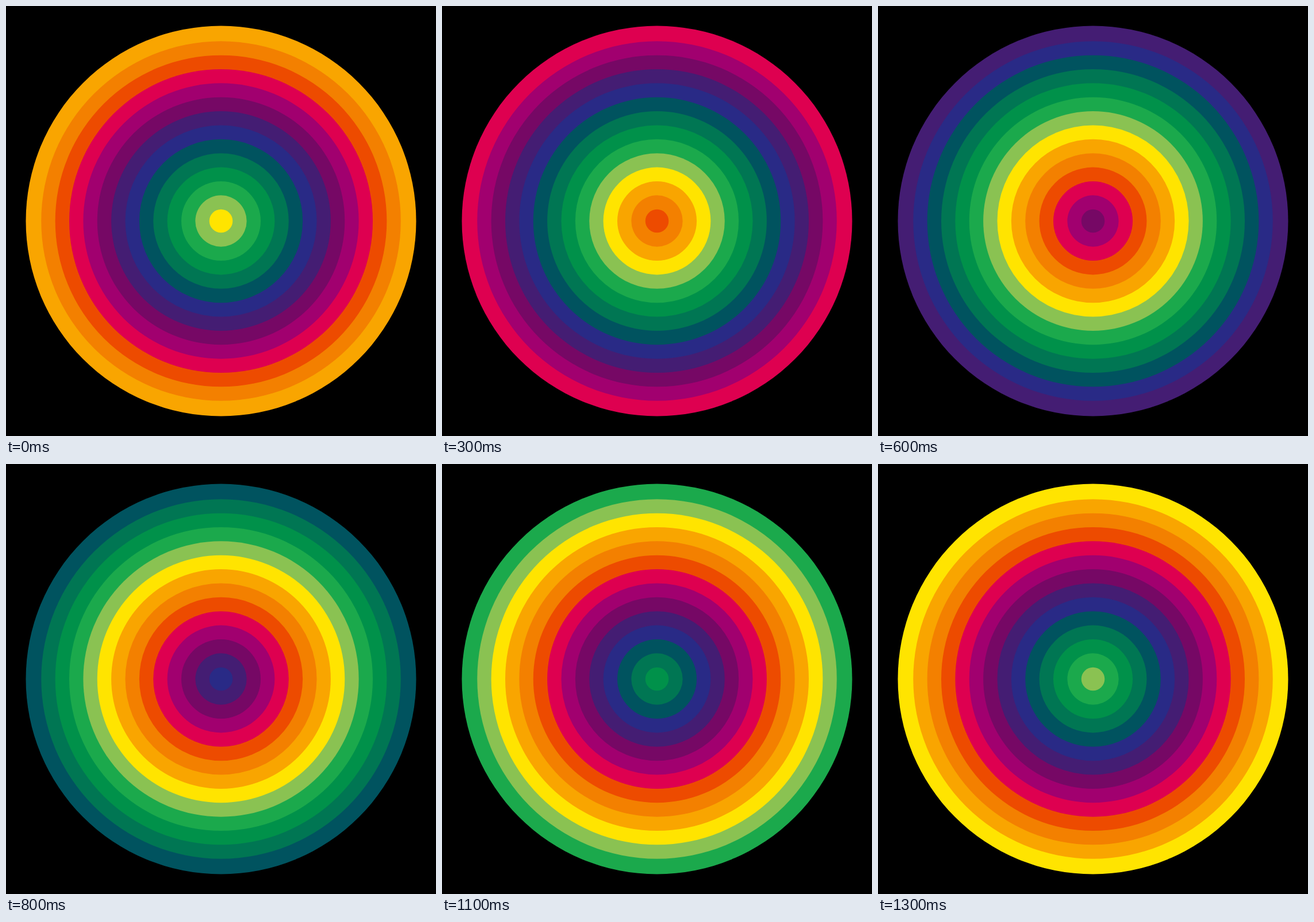
Animation of 748x748 px, one loop 1400 ms. Source, as an HTML page:

```html
<!DOCTYPE html>
<html lang="en">
<head>
<meta charset="utf-8">
<title>Rainbow rings</title>
<style>
  html, body { margin: 0; width: 100%; height: 100%; overflow: hidden; background: #000; }
  svg { display: block; width: 100%; height: 100%; }
</style>
</head>
<body>
<svg id="stage" viewBox="0 0 748 748"></svg>
<script>
  const COLORS = [
    '#ffe400', '#f9a500', '#f38000', '#ed4b00', '#de0050', '#a1006f', '#760865',
    '#441d73', '#292a86', '#00535f', '#007653', '#00914a', '#1ba94c', '#8ac252'
  ];
  const COUNT = COLORS.length;
  const STEP_MS = 100;
  const CENTER = 374;
  const INNER = 20.3, GAP = 24.37, OUTER = 339.5;

  const stage = document.getElementById('stage');
  const radius = i => i === COUNT - 1 ? OUTER : INNER + GAP * i;

  function addRing(i) {
    const ring = document.createElementNS('http://www.w3.org/2000/svg', 'circle');
    ring.setAttribute('cx', CENTER);
    ring.setAttribute('cy', CENTER);
    ring.setAttribute('r', radius(i));
    stage.prepend(ring);
    return ring;
  }

  const rings = COLORS.map((_, i) => addRing(i));

  // Colours travel outward by one ring per step.
  function draw(time) {
    const step = Math.floor(time / STEP_MS) % COUNT;
    rings.forEach((ring, i) => {
      ring.setAttribute('fill', COLORS[(step - i + COUNT) % COUNT]);
    });
  }

  const start = performance.now();
  function tick() {
    draw(performance.now() - start);
    requestAnimationFrame(tick);
  }
  tick();
</script>
</body>
</html>
```
